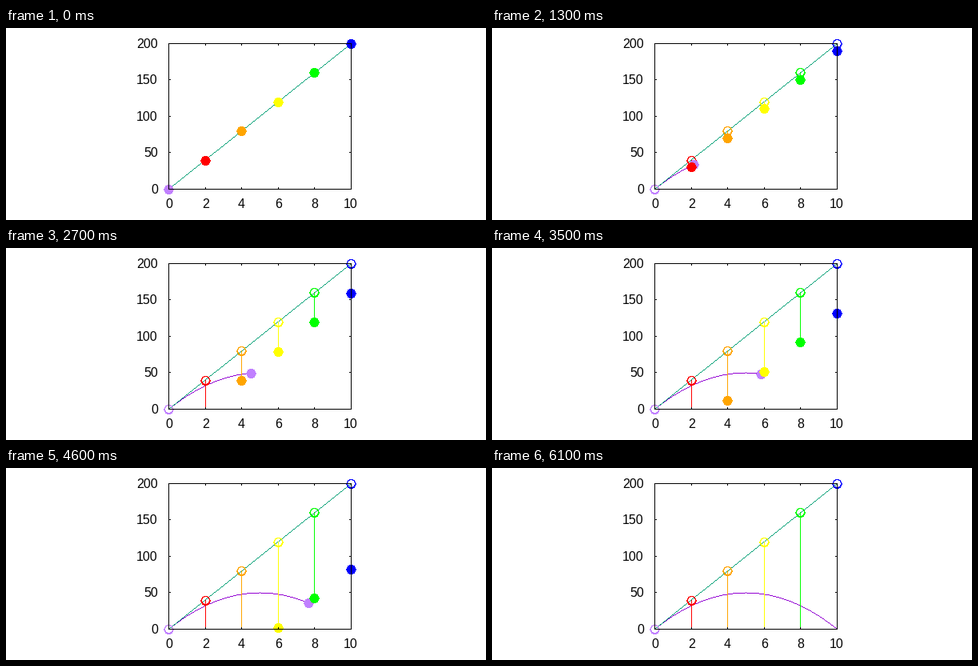
These frames come from a looping animation (600x240 px, 6.2 s). A matplotlib script:

```python
import numpy as np
import matplotlib.pyplot as plt
from matplotlib.animation import FuncAnimation

W, H = 600, 240
LEFT, RIGHT, TOP, BOTTOM = 203, 431, 19, 201
FRAMES, INTERVAL = 62, 100
STEP = 1 / 6            # horizontal distance per frame
TICK = 2
DIGIT = 9               # advance of one digit in pixels
BULLET = "#c080ff"
TRAIL = "#9400d3"
SIGHT = "#009e73"
TARGETS = {2: "#ff0000", 4: "#ffa500", 6: "#ffff00", 8: "#00ff00", 10: "#0000ff"}

plt.rcParams["text.hinting"] = "default"


def px(x):
    return np.floor(LEFT + np.asarray(x) * (RIGHT - LEFT) / 10 + 0.5)


def py(y):
    return np.ceil(BOTTOM - np.asarray(y) * (BOTTOM - TOP) / 200 - 0.5)


def drop(x):
    return 2 * x ** 2


def aim(x):
    return 20 * x


def flight(x):
    return aim(x) - drop(x)


fig = plt.figure(figsize=(W / 100, H / 100), dpi=100, facecolor="white")
ax = fig.add_axes([0, 0, 1, 1])
ax.set_xlim(0, W)
ax.set_ylim(H, 0)
ax.axis("off")


def set_pixels(dots, xs, ys):
    # offsets keep the pixel marker clear of its rounding edge
    xs, ys = np.broadcast_arrays(xs, ys)
    dots.set_data(xs + 0.25, ys + 0.75)


def pixels(xs, ys, color, z):
    """Plot crisp single-pixel dots at whole pixel positions."""
    dots, = ax.plot([], [], ",", color=color, zorder=z, antialiased=False)
    set_pixels(dots, xs, ys)
    return dots


# pixel offsets of the filled and the open marker
dy, dx = np.mgrid[-7:8, -7:8]
filled = dx ** 2 + (dy - 0.5) ** 2 <= 36.5
hollow = filled & (dx ** 2 + dy ** 2 > 18)
DISC = dx[filled], dy[filled]
RING = dx[hollow], dy[hollow]


def place(dots, x, y):
    dots.set_visible(bool(0 <= x <= 10 and y >= 0))
    set_pixels(dots, px(x) + DISC[0], py(y) + DISC[1])


def draw_ring(x, color):
    pixels(px(x) + RING[0], py(aim(x)) + RING[1], color, 5)


def label(x, baseline, text):
    ax.text(x, baseline, text, ha="left", va="baseline",
            family="Liberation Sans", size=16 * 72 / 100)


def draw_axes():
    xs, ys = np.arange(LEFT, RIGHT + 1), np.arange(TOP, BOTTOM + 1)
    for y in (TOP, BOTTOM):
        pixels(xs, y, "black", 9)
    for x in (LEFT, RIGHT):
        pixels(x, ys, "black", 9)
    inward = np.arange(TICK + 1)
    for v in range(0, 11, 2):
        pixels(px(v), TOP + inward, "black", 9)
        pixels(px(v), BOTTOM - inward, "black", 9)
        text = str(v)
        label(np.ceil(px(v) - DIGIT * len(text) / 2), 225, text)
    for v in range(0, 201, 50):
        pixels(LEFT + inward, py(v), "black", 9)
        pixels(RIGHT - inward, py(v), "black", 9)
        text = str(v)
        label(190 - DIGIT * len(text), py(v) + 6, text)


draw_axes()
columns = np.arange(LEFT, RIGHT + 1)
column_x = (columns - LEFT) * 10 / (RIGHT - LEFT)
trail = pixels([], [], TRAIL, 2)
pixels(columns, py(aim(column_x)), SIGHT, 3)
draw_ring(0, BULLET)
bullet = pixels([], [], BULLET, 6)
falls = []
for start, color in TARGETS.items():
    draw_ring(start, color)
    falls.append((start, pixels([], [], color, 4), pixels([], [], color, 7)))


def update(i):
    x = i * STEP
    place(bullet, x, flight(x))
    seen = columns <= px(min(x, 10))
    set_pixels(trail, columns[seen], py(flight(column_x[seen])))
    for start, line, dot in falls:
        y = aim(start) - drop(x)
        place(dot, start, y)
        set_pixels(line, px(start), np.arange(py(aim(start)), py(max(y, 0)) + 1))
    return []


anim = FuncAnimation(fig, update, frames=FRAMES, interval=INTERVAL,
                     init_func=lambda: [], repeat=True, repeat_delay=0)
plt.show()
```
